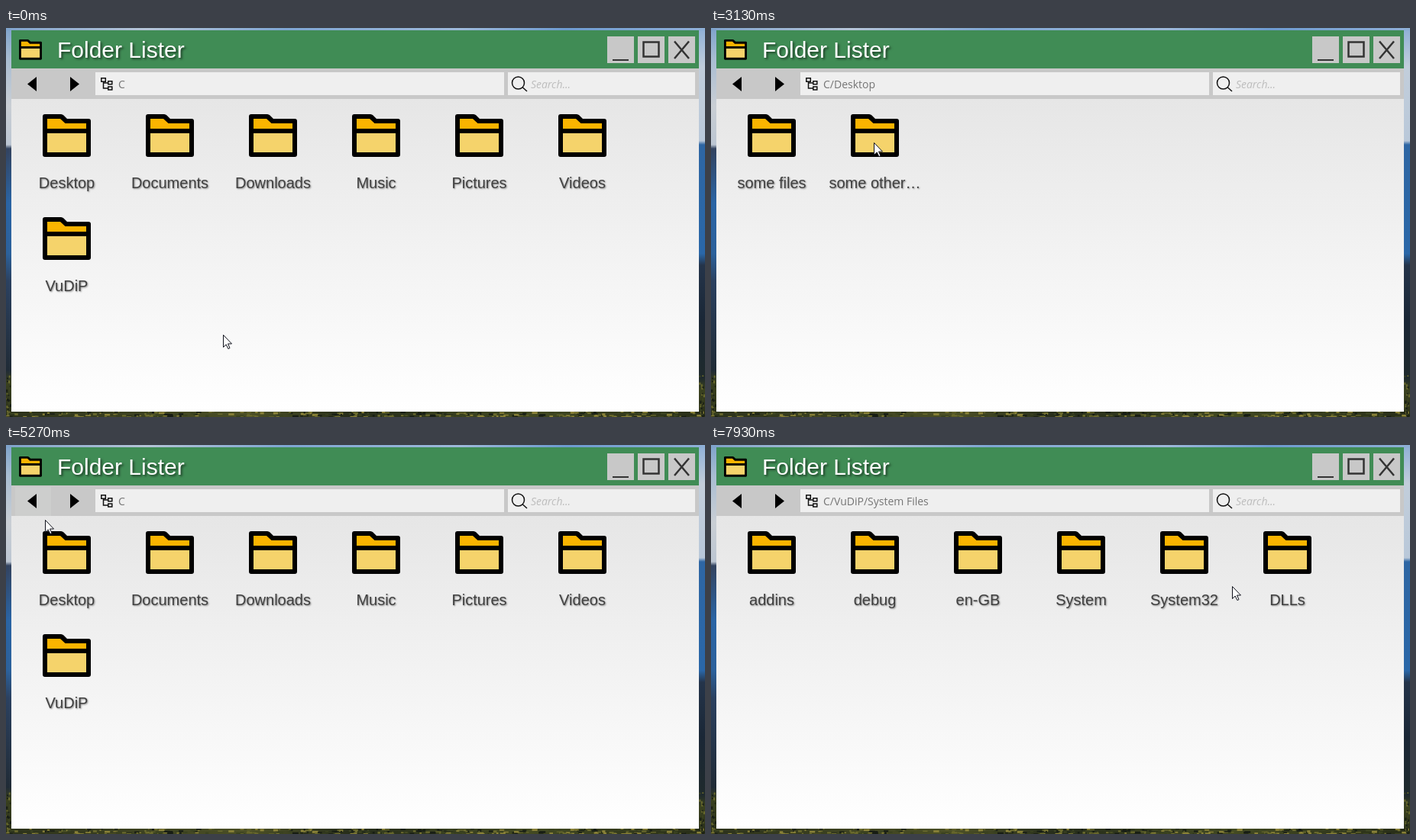
Animation of 915 by 510 pixels, one loop 8 s. Source, as an HTML page with a canvas:

```html
<!DOCTYPE html>
<html lang="en">
<head>
<meta charset="utf-8">
<title>Folder Lister</title>
<style>
html, body { margin: 0; width: 100%; height: 100%; overflow: hidden; }
#stage { position: relative; width: 915px; height: 510px; overflow: hidden; }
#stage > *, .view, .label { position: absolute; }
#stage div { white-space: pre; }
.title { left: 7px; top: 3px; width: 900px; height: 50px; background: #408c55; }
.bar { left: 7px; top: 53px; width: 900px; height: 40px; background: #c8c8c8; }
.body { left: 7px; top: 93px; width: 900px; height: 410px; background: linear-gradient(#e6e6e6, #fff); }
.name { left: 67px; top: 3px; font: 30px/52px "Liberation Sans", Arial, sans-serif; color: #fff; text-shadow: 2px 2px 3px rgba(0,0,0,.55); }
.field { top: 58px; height: 30px; background: #efefef; box-sizing: border-box; padding-left: 30px; font: 14px/31px "Open Sans", sans-serif; color: #757575; }
#path { left: 117px; width: 535px; }
#search { left: 657px; width: 245px; font-style: italic; color: #bdbdbd; }
#hover { left: 12px; top: 55px; width: 47px; height: 38px; background: #cdcecd; }
.label { width: 135px; height: 30px; text-align: center; font: 20px/30px "Liberation Sans", Arial, sans-serif; color: #404040; text-shadow: 1px 1px 2px rgba(0,0,0,.42); }
svg { left: 0; top: 0; }
.view, .view svg { left: 0; top: 0; width: 915px; height: 510px; position: absolute; }
.left, .right { top: 0; width: 9px; height: 510px; }
.left { left: 0; background: linear-gradient(#7fa3cb, #a9bdd2 8%, #c9ced4 20%, #bcc6d2 30%, #33435f 31%, #2a64a4 45%, #2c619b 58%, #2b4160 65%, #202b36 88%, #39401f 91%, #2c321b); }
.right { left: 906px; background: linear-gradient(#8fb0d6, #c2cedb 10%, #b9c8d9 29%, #2e66a3 30%, #2a67a8 58%, #24344a 61%, #1a2736 75%, #1f2a2c 90%, #3b421f 93%, #272d18); }
.sky { left: 0; top: 0; width: 915px; height: 4px; background: linear-gradient(90deg, #7fa3cb, #b4c4d6 20%, #7ea6d2 40%, #9db9d9 65%, #6d9bcf 80%, #8fb0d6); }
.trees { left: 0; top: 502px; width: 915px; height: 8px; background: linear-gradient(90deg, #2c321b, #4b4f25 35%, #252c1a 50%, #434a22 75%, #272d18); }
</style>
</head>
<body>
<div id="stage">
  <div class="left"></div>
  <div class="right"></div>
  <div class="sky"></div>
  <div class="trees"></div>
  <canvas id="leaves" width="915" height="510"></canvas>
  <div class="title"></div>
  <div class="bar"></div>
  <div class="body"></div>
  <div id="hover"></div>
  <div class="name">Folder Lister</div>
  <div class="field" id="path"></div>
  <div class="field" id="search">Search...</div>
  <svg width="915" height="510">
    <defs>
      <g id="folder">
        <path d="M3 0H24Q26 0 27.500 1.500L32 6H60Q63 6 63 9V53Q63 56 60 56H3Q0 56 0 53V3Q0 0 3 0Z"/>
        <path d="M6 6H23L29.500 12H57V19H6Z" fill="#fab400"/>
        <path d="M6 25H57V50H6Z" fill="#f5d36b"/>
      </g>
    </defs>
    <use href="#folder" transform="translate(17 15) scale(.476)"/>
    <path d="M787 11h35v35h-35zM827 11h35v35h-35zM867 11h35v35h-35z" fill="#c8c8c8"/>
    <g fill="none" stroke="#333">
      <path d="M794 42h21" stroke-width="2"/>
      <path d="M834.500 18.500h20v19h-20z" stroke-width="2.500"/>
      <path d="M875 17.500L894 40M894 17.500L875 40" stroke-width="2.500"/>
    </g>
    <path d="M28 73.500L40 64V83ZM96 73.500L84 64V83Z"/>
    <g fill="none" stroke="#111" stroke-width="1.500">
      <path d="M124.800 65.800h5.500v4.500h-5.500zM133.800 69.800h5v4h-5zM133.800 77h5v4h-5zM127.500 70.500V79H133.500M127.500 72H133.500"/>
      <circle cx="670.500" cy="72" r="8"/>
      <path d="M676.200 77.700L682 83"/>
    </g>
  </svg>
  <div id="views" style="left:0;top:0"></div>
  <svg width="915" height="510">
    <path id="cursor" d="M.5 .5V16.500L4.200 13L6.900 18.600L9 17.600L6.500 12H11.500Z" fill="#fff" stroke="#10121c" stroke-width="1" stroke-linejoin="round"/>
  </svg>
</div>
<script>
const $ = id => document.getElementById(id);
const LOOP = 8000, FPS = 15;

const views = {
  "C": ["Desktop", "Documents", "Downloads", "Music", "Pictures", "Videos", "VuDiP"],
  "C/VuDiP": ["System Files"],
  "C/VuDiP/System Files": ["addins", "debug", "en-GB", "System", "System32", "DLLs"],
  "C/Desktop": ["some files", "some other…"],
  "C/Desktop/some files": [],
  "C/Desktop/some other files": []
};

// [time, folder opened]
const visits = [
  [0, "C"], [930, "C/VuDiP"], [1870, "C"], [2470, "C/Desktop"],
  [3270, "C/Desktop/some other files"], [3670, "C/Desktop"],
  [4070, "C/Desktop/some files"], [4530, "C/Desktop"], [5130, "C"],
  [6000, "C/VuDiP"], [6400, "C/VuDiP/System Files"]
];

// [time, x, y, optional rest] of the pointer tip
const moves = [
  [0, 284, 402], [170, 298, 375], [500, 140, 228], [670, 63, 262],
  [730, 69, 281, 270], [1130, 75, 282, 70], [1400, 81, 251],
  [1730, 40, 78], [2070, 41, 83], [2330, 70, 128, 270],
  [3130, 213, 150, 140], [3600, 40, 76, 70], [3930, 72, 142, 140],
  [4400, 43, 81, 70], [4730, 52, 86], [5130, 43, 83],
  [5270, 51, 98], [5730, 89, 294], [5800, 97, 295, 200],
  [6330, 83, 152], [6530, 86, 156], [6800, 151, 195],
  [7130, 210, 268], [7470, 378, 215], [7670, 355, 165, 60],
  [7870, 560, 190], [7930, 682, 185, 70]
];

const panes = {};
for (const [path, names] of Object.entries(views)) {
  const pane = panes[path] = document.createElement("div");
  pane.className = "view";
  const cells = names.map((name, i) => ({ name, x: 135 * (i % 6), y: 135 * Math.floor(i / 6) }));
  pane.innerHTML = `<svg>${cells.map(c => `<use href="#folder" x="${48 + c.x}" y="${113 + c.y}"/>`).join("")}</svg>` +
    cells.map(c => `<div class="label" style="left:${12 + c.x}px;top:${188 + c.y}px">${c.name}</div>`).join("");
  $("views").append(pane);
}

function paintLeaves() {
  const g = $("leaves").getContext("2d");
  const tones = ["#171d14", "#6a6a2d", "#3a4220", "#8a8238"];
  let seed = 7;
  const rand = () => (seed = seed * 16807 % 2147483647) / 2147483647;
  for (let i = 0; i < 410; i++) {
    const side = i >= 360;
    g.fillStyle = tones[Math.floor(rand() * (side ? 3 : 4))];
    if (side) g.fillRect((i % 2) * 907 + rand() * 6, 455 + rand() * 50, 2, 1 + rand() * 3);
    else g.fillRect(rand() * 915, 502 + rand() * 8, 2 + rand() * 6, 1 + rand() * 2);
  }
}

function pointerAt(t) {
  const i = moves.findLastIndex(m => m[0] <= t);
  const [t0, x0, y0, rest = 0] = moves[i];
  const [t1, x1, y1] = moves[i + 1] || [LOOP, x0, y0];
  const k = t1 > t0 + rest ? Math.max(0, (t - t0 - rest) / (t1 - t0 - rest)) : 0;
  return [Math.round(x0 + (x1 - x0) * k), Math.round(y0 + (y1 - y0) * k)];
}

function render(now) {
  // hold each step, with times rounded to 10 ms
  const step = Math.floor((now % LOOP) * FPS / 1000 + .06) % (LOOP * FPS / 1000);
  const t = Math.round(step * 100 / FPS) * 10;
  const path = visits.findLast(v => v[0] <= t)[1];
  const [x, y] = pointerAt(t);
  $("path").textContent = path;
  for (const key in panes) panes[key].style.display = key === path ? "" : "none";
  $("hover").style.display = x >= 12 && x < 59 && y >= 54 && y < 99 ? "" : "none";
  $("cursor").setAttribute("transform", `translate(${x} ${y})`);
}

paintLeaves();
const start = performance.now();
function tick() {
  render(performance.now() - start);
  requestAnimationFrame(tick);
}
tick();
</script>
</body>
</html>
```
